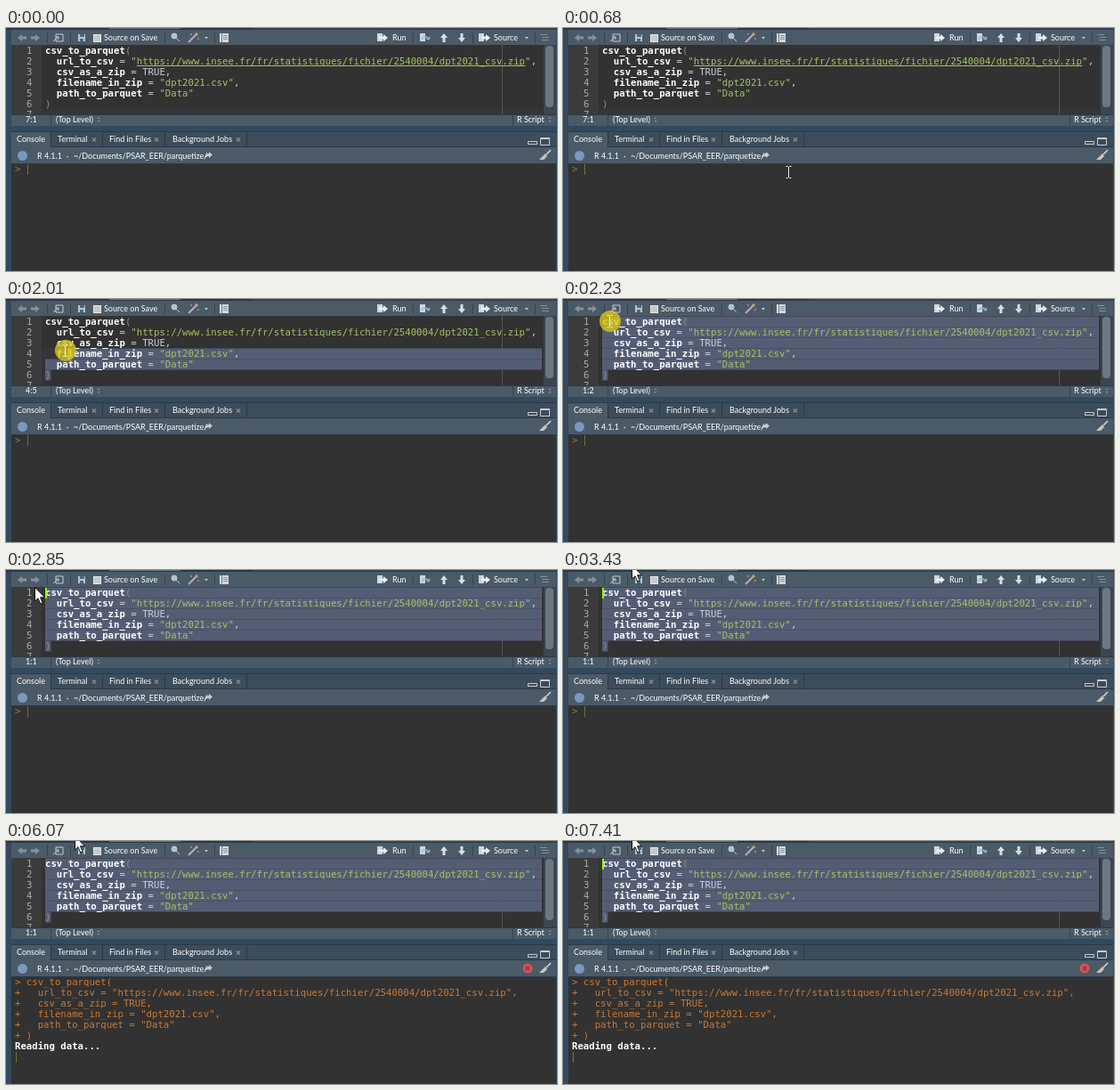
An HTML page with a canvas that plays this animation: 619 by 273 pixels, repeating every 8000 ms.

```html
<!DOCTYPE html>
<html lang="en">
<head>
<meta charset="utf-8">
<style>
  html, body { margin: 0; width: 100%; height: 100%; overflow: hidden; background: #324a5f; }
  canvas { display: block; }
</style>
</head>
<body>
<canvas id="stage" width="619" height="273"></canvas>
<script>
const ctx = document.getElementById('stage').getContext('2d');
const LOOP = 8000, CHAR = 6.422, ROW = 12, TEXT_X = 44, TEXT_Y = 19.5;
const MONO = '10.667px "DejaVu Sans Mono", monospace';
const UI = '9px Lato, sans-serif';
const C = {
  frame: '#324a5f', bar: '#4b5a67', tab: '#3d4c5a', line: '#2b3946', edge: '#647380',
  paper: '#323232', gutter: '#3b3b3b', select: '#555d75', icon: '#c5ccd2', dim: '#84919c',
  string: '#a5c261', input: '#cc7833', caret: '#91ff00'
};
const LINES = [
  'csv_to_parquet(',
  '  url_to_csv = "https://www.insee.fr/fr/statistiques/fichier/2540004/dpt2021_csv.zip",',
  '  csv_as_a_zip = TRUE,',
  '  filename_in_zip = "dpt2021.csv",',
  '  path_to_parquet = "Data"',
  ')', ''
];
const PRESS = 1580, RELEASE = 2630;
// time, x, y of the mouse
const PATH = [
  [270, 407, 245], [1070, 111.5, 86], [1240, 111.5, 86], [1410, 93.5, 89], [1580, 93.5, 89],
  [2010, 67, 58], [2230, 53, 25], [2300, 50, 21], [2400, 50, 21], [2470, 45, 18],
  [2629, 45, 18], [2630, 32, 19], [2850, 32, 19], [3260, 77, -6]
];
// alternating on and off times of the editor caret
const BLINKS = [2470, 3040, 3430, 4040, 4440, 5060, 5440, 6070, 6450, 7010, 7410];

const clamp = (v, lo, hi) => Math.min(hi, Math.max(lo, v));

function rect(x, y, w, h, color) {
  ctx.fillStyle = color;
  ctx.fillRect(x, y, w, h);
}
function text(s, x, y, color = '#fff', font = UI) {
  ctx.font = font;
  ctx.fillStyle = color;
  ctx.fillText(s, x, y);
}
function shape(d, x, y, fill, stroke, width = 1) {
  const p = new Path2D(d);
  ctx.save();
  ctx.translate(x, y);
  if (fill) { ctx.fillStyle = fill; ctx.fill(p); }
  if (stroke) { ctx.strokeStyle = stroke; ctx.lineWidth = width; ctx.stroke(p); }
  ctx.restore();
}
function disc(x, y, r, color) {
  ctx.fillStyle = color;
  ctx.beginPath();
  ctx.arc(x, y, r, 0, 7);
  ctx.fill();
}
function arrow(x, y, angle, color) {
  ctx.save();
  ctx.translate(x, y);
  ctx.rotate(angle);
  shape('M-5 -1.5H0V-4L5 0L0 4V1.5H-5Z', 0, 0, color);
  ctx.restore();
}
const separator = (x, y, h) => rect(x, y, 1, h, '#36444f');
const chevron = (x, y) => shape('M-2 -1H2L0 1.5Z', x, y, C.icon);
const upDown = (x, y) => shape('M-1.5 -1L0 -3L1.5 -1ZM-1.5 1L0 3L1.5 1Z', x, y, C.dim);

function tokenStyle(token) {
  if (token[0] === '"') return [C.string, ''];
  if (token === 'TRUE') return ['#c8cde0', ''];
  if (/\w/.test(token)) return ['#fff', 'bold '];
  if (/[()]/.test(token)) return ['#8e8c88', ''];
  return ['#d4d4d4', ''];
}

function mouseAt(t) {
  if (t < PATH[0][0]) return null;
  const i = PATH.findIndex(k => k[0] > t);
  if (i < 0) return { x: 77, y: -6 };
  const [t0, x0, y0] = PATH[i - 1], [t1, x1, y1] = PATH[i];
  let u = (t - t0) / (t1 - t0);
  if (t < PRESS || t > RELEASE) u = u * u * (3 - 2 * u);
  return { x: x0 + (x1 - x0) * u, y: y0 + (y1 - y0) * u };
}

// text position of the editor caret
function headAt(t) {
  if (t < PRESS) return { row: 6, col: 0 };
  if (t >= 2470) return { row: 0, col: 0 };
  const m = mouseAt(t);
  const row = clamp(Math.floor((m.y - TEXT_Y) / ROW), 0, 5);
  return { row, col: clamp(Math.round((m.x - TEXT_X) / CHAR), 0, LINES[row].length) };
}

function caretOn(t) {
  if (t < PRESS) return false;
  if (t < BLINKS[0]) return t < 2200;
  return BLINKS.filter(b => b <= t).length % 2 === 1;
}

function drawToolbar() {
  rect(0, 0, 619, 2, C.line);
  rect(116, 0, 80, 1, C.edge);
  rect(277, 0, 341, 1, C.tab);
  rect(6, 2, 612, 17, C.bar);
  arrow(18, 11, Math.PI, C.dim);
  arrow(33, 11, 0, C.dim);
  [46, 72, 178, 234, 457, 524, 594].forEach(x => separator(x, 5, 12));
  shape('M-3 -4H5V4H-3ZM-6 4L0 -1M-3 -1H0V2', 59, 11, null, C.icon);
  shape('M-4 -4H4V4H-4Z', 85, 11, '#b7c5d1');
  rect(83, 7, 5, 3, '#4e6880');
  rect(83, 12, 4, 3, '#4e6880');
  rect(98, 7, 9, 9, '#e3e5e6');
  rect(99, 8, 7, 7, '#c5c9cc');
  text('Source on Save', 110, 14);
  shape('M3 0A3 3 0 1 1 -3 0A3 3 0 1 1 3 0M2 2L6 6', 189, 9, '#a8c3d9', C.icon);
  shape('M-5 5L3 -3', 210, 11, null, '#b9a9d0', 2);
  shape('M3 -6V-2M1 -4H5M-3 -5V-3M5 0V2', 211, 11, null, '#dcc05c');
  chevron(225, 11);
  rect(240, 6, 10, 10, '#d4d9dd');
  rect(242, 6, 1, 10, '#71808c');
  [8, 10, 12].forEach(y => rect(244, y, 5, 1, '#8a96a0'));

  rect(417, 6, 6, 9, '#cfd5da');
  arrow(424, 11, 0, '#e7eff5');
  text('Run', 434, 14);
  rect(465, 6, 6, 9, '#cfd5da');
  shape('M-4 2A4 3 0 1 1 4 2M4 2L1 1M4 2L5 -1', 471, 11, null, '#8dbce0', 1.3);
  arrow(492, 11, -Math.PI / 2, '#d8dfe4');
  arrow(512, 11, Math.PI / 2, '#d8dfe4');
  rect(531, 6, 6, 9, '#cfd5da');
  arrow(539, 11, 0, '#e7eff5');
  text('Source', 548, 14);
  chevron(585, 11);
  [[600, 7], [602, 10], [602, 13]].forEach(([x, y]) => rect(x, y, 8, 1, C.dim));
}

function drawSelection(head) {
  for (let row = head.row; row <= 5; row++) {
    const x0 = TEXT_X + (row === head.row ? head.col * CHAR : 0);
    const x1 = row === 5 ? TEXT_X + CHAR : 602;
    if (x1 > x0) rect(x0, TEXT_Y + row * ROW, x1 - x0, ROW, C.select);
  }
}

function drawEditor(t) {
  const head = headAt(t);
  ctx.save();
  ctx.beginPath();
  ctx.rect(6, 19, 612, 78);
  ctx.clip();
  rect(6, 19, 612, 78, C.paper);
  rect(6, 19, 34, 78, C.gutter);
  rect(40, TEXT_Y + head.row * ROW, 563, ROW, '#353637');
  rect(557, 19, 1, 78, '#555');
  if (t >= PRESS) drawSelection(head);
  LINES.forEach((line, row) => {
    const y = 29 + row * ROW;
    text(row + 1, 23, y, '#a9a9a9', MONO);
    for (const m of line.matchAll(/"[^"]*"|\w+|\S/g)) {
      const [color, weight] = tokenStyle(m[0]);
      text(m[0], TEXT_X + m.index * CHAR, y, color, weight + MONO);
    }
  });
  if (t < PRESS) rect(TEXT_X + 16 * CHAR, 42, 68 * CHAR, 1, C.string);
  if (caretOn(t)) rect(TEXT_X + head.col * CHAR, 20 + head.row * ROW, 2, ROW, C.caret);
  rect(604, 19, 14, 78, '#3c4650');
  ctx.fillStyle = '#6b7781';
  ctx.beginPath();
  ctx.roundRect(606, 20, 9, 69, 4);
  ctx.fill();
  ctx.restore();

  rect(6, 97, 612, 13, C.bar);
  rect(6, 97, 612, 1, C.line);
  separator(50, 98, 12);
  separator(569, 98, 12);
  text(`${head.row + 1}:${head.col + 1}`, 22, 106);
  text('(Top Level)', 56, 106);
  upDown(104, 103);
  text('R Script', 574, 106);
  upDown(611, 103);
}

function drawConsoleHeader(t) {
  rect(6, 116, 612, 18, C.tab);
  rect(6, 116, 612, 1, C.line);
  rect(6, 117, 44, 17, C.bar);
  [['Console', 12, 50], ['Terminal', 58, 108], ['Find in Files', 116, 178], ['Background Jobs', 187, 270]]
    .forEach(([label, x, right], i) => {
      text(label, x, 128);
      rect(right, 117, 1, 17, C.line);
      if (i) shape('M-2 -2L2 2M2 -2L-2 2', right - 9, 125.5, null, C.dim, 1.2);
    });
  rect(51, 133, 567, 1, C.line);
  shape('M0 0H10V3H0Z', 586.5, 127.5, null, C.icon);
  shape('M0 0H10V8H0ZM0 1H10', 600.5, 123.5, null, C.icon);

  rect(6, 134, 612, 18, C.bar);
  rect(6, 152, 612, 1, C.line);
  disc(18.5, 143.5, 5.5, '#7898c4');
  text('R 4.1.1', 35, 147);
  text('·', 68, 147);
  text('~/Documents/PSAR_EER/parquetize/', 76, 147);
  shape('M-4 4C-4 0 -2 -2 1 -2V-4L5 -.5L1 3V1C-1 1 -3 2 -4 4Z', 227, 143, C.icon);
  shape('M6 -6L1 -1', 606, 143, null, '#d0d5d8', 1.6);
  shape('M0 -2L2 1L-2 5L-7 5Z', 606, 143, '#c9c5b6');

  ctx.globalAlpha = clamp((t - 5300) / 260, 0, 1);
  disc(586, 143, 5.5, '#d0565d');
  rect(583.5, 140.5, 5, 5, '#b03a43');
  ctx.globalAlpha = 1;
}

function drawConsole(t) {
  rect(6, 153, 612, 120, C.paper);
  const ran = t >= 4500, reading = t >= 4560;
  if (ran) {
    LINES.slice(0, 6).forEach((line, i) =>
      text((i ? '+ ' : '> ') + line, 10, 162 + i * ROW, C.input, MONO));
  } else {
    text('>', 10, 162, '#92794c', MONO);
  }
  if (reading) text('Reading data...', 10, 234, '#fff', 'bold ' + MONO);
  const [x, y] = reading ? [11, 237] : ran ? [11, 225] : [24, 153];
  rect(x, y, 1, ROW, '#66793a');
}

function drawMouse(t) {
  const m = mouseAt(t);
  if (!m) return;
  if (t >= PRESS && t < RELEASE) disc(m.x, m.y, 12, 'rgba(218,200,24,.78)');
  const overText = m.y > 153 || (m.x > 40 && m.y > 17 && m.y < 97);
  if (overText) {
    const x = Math.round(m.x - .5) + .5, y = Math.round(m.y);
    shape('M-3 -6.5H-1L0 -5.5L1 -6.5H3M0 -6V6M-3 6.5H-1L0 5.5L1 6.5H3', x, y, null, '#e8e8e8');
  } else {
    shape('M.5 .5V16L4 12.7L6.7 19L9.2 18L6.5 11.8H11.5Z', m.x, m.y, '#fff', '#111');
  }
}

function draw(now) {
  const t = now % LOOP;
  rect(0, 0, 619, 273, C.frame);
  drawToolbar();
  drawEditor(t);
  drawConsoleHeader(t);
  drawConsole(t);
  drawMouse(t);
  requestAnimationFrame(draw);
}
requestAnimationFrame(draw);
</script>
</body>
</html>
```
